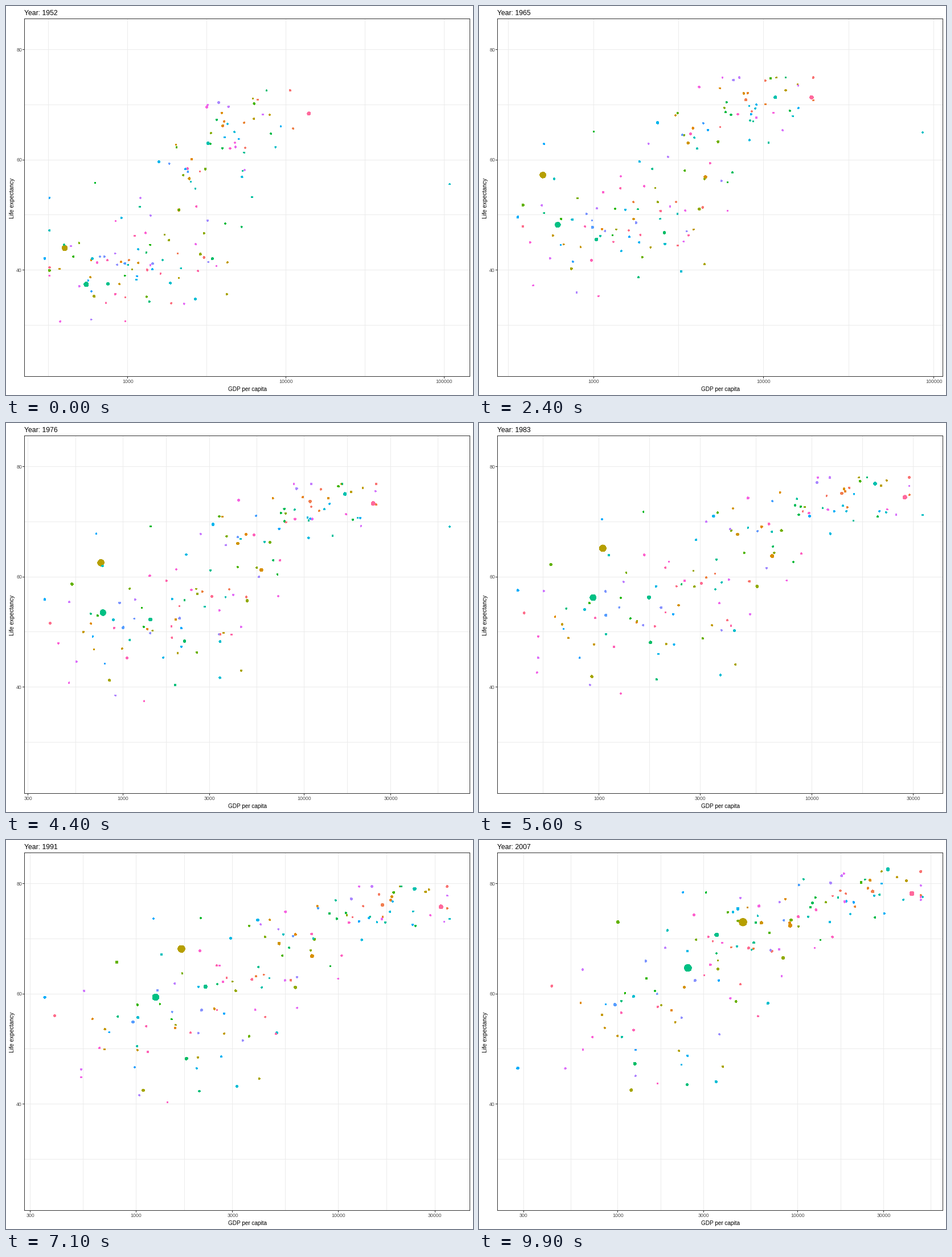
These frames come from a looping animation (820x683 px, 10000 ms). A matplotlib script:

```python
import numpy as np
import matplotlib.pyplot as plt
from matplotlib.animation import FuncAnimation
from matplotlib.collections import LineCollection

W, H, DPI = 820, 683, 64
LEFT, RIGHT, TOP, BOTTOM = 32.5, 814.5, 22.5, 650.5
FRAMES, STEPS, COUNTRIES = 100, 12, 142
steps = np.arange(STEPS)  # one step is five years
t = steps / (STEPS - 1)


def ease(start, end, power=1.0):
    return start + (end - start) * t ** power


def log_ease(start, end, power=1.0):
    return ease(np.log10(start), np.log10(end), power)


def through(points):
    """Straight lines through (step, value) points."""
    return np.interp(steps, *zip(*points))


# The poorest and richest countries set the moving x range.
LOWEST = np.log10(through([(0, 299), (2, 355), (5, 371), (6, 424), (9, 312), (10, 241), (11, 278)]))
HIGHEST = np.log10(through([(0, 108382), (1, 113523), (3, 80895), (4, 109348),
                            (5, 59265), (6, 33693), (7, 31541), (11, 49357)]))
LOWEST_LIFE = through([(0, 42.1), (5, 56.2), (8, 59.5), (9, 43), (11, 46.5)])

# palette index, population in millions, (GDP, GDP, power), (life, life, power)
GIANTS = [
    (25, 556, 1319, (400, 4959, 1.7), (44, 73, .55)),        # China
    (59, 372, 1110, (547, 2452, 1.8), (37.4, 64.7, .65)),    # India
    (135, 158, 301, (13990, 42952, .9), (68.4, 78.2, .85)),  # United States
    (60, 82, 224, (750, 3541, 1.1), (37.5, 70.7, 1)),        # Indonesia
    (15, 57, 190, (2109, 9066, .45), (50.9, 72.4, .9)),      # Brazil
    (67, 86, 127, (3217, 31656, .4), (63, 82.6, .6)),        # Japan
]

# count, (GDP, GDP), (life, life), spread of log GDP, spread of life at both ends
REGIONS = [
    (51, (1000, 1550), (39, 54.5), .31, (4.6, 8.5)),
    (23, (3050, 8950), (54.7, 73), .22, (8, 3.6)),
    (28, (1500, 5600), (47, 71.5), .38, (8, 5.5)),
    (32, (5300, 26500), (65.8, 78.3), .24, (5, 2.6)),
]


def drift(rng):
    """Slowly changing rank of a country inside its region."""
    a, b = rng.normal(size=2)
    return ease(*np.clip([a, .8 * a + .6 * b], -2.1, 2.1))


def make_countries():
    rows = [(88, LOWEST, LOWEST_LIFE, ease(20, 48)),
            (72, HIGHEST, ease(55.6, 77.6, .6), ease(.2, 2.5))]
    rows += [(idx, log_ease(*gdp), ease(*life), ease(p0, p1))
             for idx, p0, p1, gdp, life in GIANTS]

    rng = np.random.default_rng(1952)
    taken = {r[0] for r in rows}
    free = list(rng.permutation([i for i in range(1, COUNTRIES + 1) if i not in taken]))
    floor = np.maximum(LOWEST + .03, log_ease(310, 430))
    ceiling = np.minimum(HIGHEST - .01, log_ease(14700, 48500))
    for count, gdp, life, gdp_sd, life_sd in REGIONS:
        for _ in range(count):
            rich, fit = drift(rng), drift(rng)
            g = log_ease(*gdp, .65) + gdp_sd * rich + rng.normal(0, .025, STEPS)
            y = ease(*life, .65) + ease(*life_sd) * (.5 * rich + .86 * fit)
            y += rng.normal(0, .3, STEPS)
            pop = min(np.exp(rng.normal(1.3, 1.2)), 40)
            rows.append((free.pop(), np.clip(g, floor, ceiling),
                         np.clip(y, ease(29.5, 40), ease(72.6, 82.2)), ease(pop, 2.2 * pop)))
    return sorted(rows, key=lambda r: r[0])


def hcl(hue, chroma=100, lum=65):
    """Polar LUV colour to sRGB."""
    h = np.radians(hue)
    Y = ((lum + 16) / 116) ** 3
    u = chroma * np.cos(h) / (13 * lum) + .19784
    v = chroma * np.sin(h) / (13 * lum) + .46834
    X = 2.25 * Y * u / v
    Z = -X / 3 - 5 * Y + 3 * Y / v
    lin = np.clip([3.24048 * X - 1.53715 * Y - .49854 * Z,
                   -.96926 * X + 1.87599 * Y + .04156 * Z,
                   .05565 * X - .20404 * Y + 1.05731 * Z], 0, 1)
    return np.where(lin > .00304, 1.055 * lin ** (1 / 2.4) - .055, 12.92 * lin)


rows = make_countries()
GDP, LIFE, POP = (np.array([r[i] for r in rows]) for i in (1, 2, 3))
COLORS = [hcl(15 + 360 * (r[0] - 1) / COUNTRIES) for r in rows]


def px(n):
    return n * 72 / DPI


def life_y(life):
    return 463.6 - (life - 40) * 9.675


def crisp(v):
    """Centre of the pixel that holds v."""
    return np.floor(v) + .5


def axis_breaks(hi):
    """Whole decades on a wide range, else 1-3-10."""
    decades = np.arange(1.0, 7)
    if hi >= 5:
        return decades
    return np.sort(np.r_[decades, decades + np.log10(3)])


plt.rcParams["font.family"] = "Liberation Sans"
fig = plt.figure(figsize=(W / DPI, H / DPI), dpi=DPI, facecolor="white")
ax = fig.add_axes([0, 0, 1, 1])
ax.set(xlim=(0, W), ylim=(H, 0))
ax.axis("off")


def lines(segments, color, z):
    coll = LineCollection(segments, colors=color, linewidths=px(1), antialiaseds=False, zorder=z)
    coll.set_snap(False)
    return ax.add_collection(coll, autolim=False)


def across(x0, x1, values):
    return [[(x0, crisp(life_y(v))), (x1, crisp(life_y(v)))] for v in values]


def upright(xs, y0, y1):
    return [[(crisp(x), y0), (crisp(x), y1)] for x in xs]


def label(x, y, text, size, color="black", **kw):
    return ax.text(x, y, text, fontsize=px(size), color=color, **kw)


lines(across(LEFT, RIGHT, range(30, 81, 10)), "#EBEBEB", 1)
lines([[(LEFT, TOP), (RIGHT, TOP), (RIGHT, BOTTOM), (LEFT, BOTTOM), (LEFT, TOP)]], "#333333", 4)
lines(across(LEFT - 3, LEFT, (40, 60, 80)), "#333333", 4)
for v in (40, 60, 80):
    label(28, life_y(v) + .5, str(v), 8.8, "#4D4D4D", ha="right", va="center")
label(423.5, 676, "GDP per capita", 10, ha="center", va="baseline")
label(11, 337, "Life expectancy", 10.3, ha="center", va="center", rotation=90)

title = label(32, 16, "", 12.3, va="baseline")
grid = lines([], "#EBEBEB", 1)
ticks = lines([], "#333333", 4)
tick_labels = [label(0, 660, "", 8.8, "#4D4D4D", ha="center", va="center") for _ in range(6)]
dots = ax.scatter(GDP[:, 0], LIFE[:, 0], c=COLORS, linewidths=0, antialiased=False, zorder=3)


def update(frame):
    step = min(frame // 9, STEPS - 2)
    part = frame / 9 - step
    gdp, life, pop = (a[:, step] * (1 - part) + a[:, step + 1] * part for a in (GDP, LIFE, POP))

    pad = .05 * np.ptp(gdp)
    lo, hi = gdp.min() - pad, gdp.max() + pad

    def gdp_x(g):
        return LEFT + (RIGHT - LEFT) * (g - lo) / (hi - lo)

    breaks = axis_breaks(hi)
    minor = (breaks[1:] + breaks[:-1]) / 2
    major = [gdp_x(b) for b in breaks if lo <= b <= hi]
    values = [10 ** b for b in breaks if lo <= b <= hi]
    grid.set_segments(upright(major + [gdp_x(b) for b in minor if lo <= b <= hi], TOP, BOTTOM))
    ticks.set_segments(upright(major, BOTTOM, BOTTOM + 3))
    for i, text in enumerate(tick_labels):
        shown = i < len(major)
        text.set_visible(shown)
        if shown:
            text.set_x(major[i])
            text.set_text(f"{values[i]:.0f}")

    dots.set_offsets(np.c_[gdp_x(gdp), life_y(life)])
    dots.set_sizes(px(2.2 + 11.2 * np.sqrt(pop / 1319)) ** 2)
    title.set_text(f"Year: {round(1952 + 55 * frame / (FRAMES - 1))}")
    return dots, grid, ticks, title, *tick_labels


anim = FuncAnimation(fig, update, frames=FRAMES, init_func=lambda: update(0),
                     interval=100, repeat=True, blit=False)
plt.show()
```
